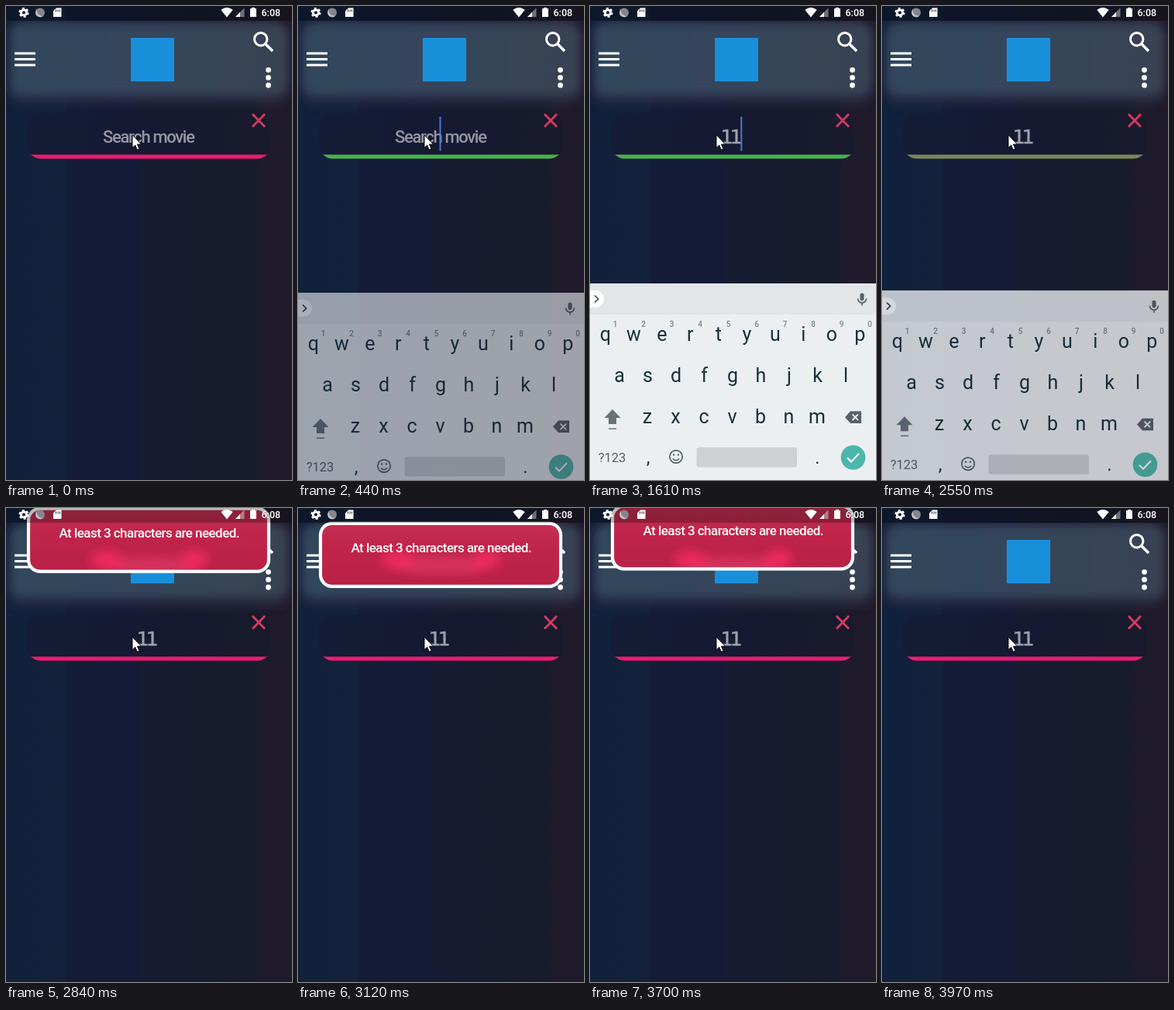
Recreate the animation shown at these times as an HTML page. Size 369x610 px, loop 4.18 s.

```html
<!DOCTYPE html>
<html lang="en">
<head>
<meta charset="utf-8">
<title>Search field validation</title>
<style>
  html, body { margin: 0; width: 100%; height: 100%; overflow: hidden; background: #14192f; }
  svg { display: block; width: 100vw; height: 100vh; }
  text { font-family: Roboto, "Liberation Sans", sans-serif; }
  .mid { text-anchor: middle; }
  .line { fill: none; stroke-linecap: round; stroke-linejoin: round; }
</style>
</head>
<body>
<svg viewBox="0 0 369 610" preserveAspectRatio="none">
  <defs>
    <linearGradient id="night">
      <stop offset="0" stop-color="#12213b"/>
      <stop offset=".211" stop-color="#13213b"/>
      <stop offset=".211" stop-color="#151c38"/>
      <stop offset=".464" stop-color="#151b37"/>
      <stop offset=".466" stop-color="#161c32"/>
      <stop offset=".65" stop-color="#161c2f"/>
      <stop offset=".88" stop-color="#181c2d"/>
      <stop offset=".882" stop-color="#1f1b2c"/>
      <stop offset="1" stop-color="#201b2b"/>
    </linearGradient>
    <linearGradient id="slate">
      <stop offset="0" stop-color="#30465b"/>
      <stop offset=".5" stop-color="#35455b"/>
      <stop offset="1" stop-color="#384353"/>
    </linearGradient>
    <linearGradient id="inset">
      <stop offset="0" stop-color="#141c36"/>
      <stop offset=".5" stop-color="#151932"/>
      <stop offset="1" stop-color="#191a2c"/>
    </linearGradient>
    <linearGradient id="crimson" x2="0" y2="1">
      <stop offset="0" stop-color="#c23153"/>
      <stop offset=".4" stop-color="#c1244a"/>
      <stop offset="1" stop-color="#b82146"/>
    </linearGradient>
    <filter id="soft" x="-20%" y="-50%" width="140%" height="200%"><feGaussianBlur stdDeviation="6"/></filter>
    <clipPath id="fieldClip"><rect x="27" y="138" width="315" height="58.600" rx="18"/></clipPath>
    <clipPath id="cardClip"><rect id="cardHole" x="29" width="310" height="81" rx="15"/></clipPath>
    <clipPath id="belowBar"><rect y="19" width="369" height="130"/></clipPath>
  </defs>

  <rect width="369" height="610" fill="url(#night)"/>

  <g clip-path="url(#belowBar)">
    <rect x="2" y="18" width="365" height="108" rx="20" fill="#30304b" opacity=".65" filter="url(#soft)"/>
    <rect x="7" y="23" width="355" height="91" rx="14" fill="url(#slate)" filter="url(#soft)"/>
    <rect x="14" y="29" width="341" height="80" rx="12" fill="url(#slate)" opacity=".5" filter="url(#soft)"/>
  </g>
  <path d="M11 61H38M11 68.500H38M11 76H38" stroke="#fff" stroke-width="3"/>
  <rect x="161" y="41" width="56" height="56" fill="#198fda"/>
  <g fill="none" stroke="#fff" stroke-width="3">
    <circle cx="328.700" cy="42.700" r="8.200"/>
    <path d="M334.500 48.500L344 58" stroke-width="3.500"/>
  </g>
  <g fill="#fff">
    <circle cx="338.500" cy="82.300" r="3.400"/>
    <circle cx="338.500" cy="92.200" r="3.400"/>
    <circle cx="338.500" cy="102" r="3.400"/>
  </g>

  <g clip-path="url(#fieldClip)">
    <rect x="27" y="138" width="315" height="59" fill="url(#inset)"/>
    <rect id="underline" x="27" y="191.300" width="315" height="6"/>
  </g>
  <path d="M318 139L334 155.500M334 139L318 155.500" stroke="#e0385f" stroke-width="2.700"/>
  <text id="hint" x="125" y="175.500" font-size="22" font-weight="500" letter-spacing="-1.330" fill="#9696a2">Search movie</text>
  <text id="typed" y="176.500" font-size="25.500" letter-spacing="-4.220" fill="#a0a0ab" stroke="#a0a0ab" stroke-width=".4" style="font-family:'DejaVu Sans',sans-serif"></text>
  <rect id="caret" y="142.500" width="2" height="44" fill="#477bd2"/>

  <g id="keyboard">
    <rect y="357" width="369" height="300" fill="#eceff1"/>
    <rect y="357" width="369" height="40" fill="#e2e6e9"/>
    <rect x="-12" y="366" width="30" height="22" rx="11" fill="#fff"/>
    <path d="M6.500 373L10.800 377L6.500 381" class="line" stroke="#37474f" stroke-width="1.700"/>
    <g id="words" class="mid" font-size="16.500" fill="#5f6b72">
      <path d="M129.500 366V388M237.500 366V388" stroke="#c5cacd"/>
      <text x="81" y="384">thanks</text><text x="183" y="384">I</text><text x="285" y="384">we</text>
    </g>
    <g fill="none" stroke="#566168" stroke-width="1.700">
      <rect x="349.300" y="370.300" width="3.400" height="8" rx="1.700" fill="#566168"/>
      <path d="M345.500 376.500a5.500 5.500 0 0 0 11 0M351 382V385.500"/>
    </g>
    <g id="keys" class="mid" fill="#17303a"></g>
    <path d="M29 519L39.500 530H34V538H24V530H18.500Z" fill="#687378"/>
    <path d="M24 544H34" stroke="#687378" stroke-width="1.500"/>
    <path d="M336 521.500H350V537H336L329 529.200Z" fill="#566168"/>
    <path d="M338.500 525.500L346 533M346 525.500L338.500 533" stroke="#eceff1" stroke-width="1.800"/>
    <g fill="none" stroke="#566168" stroke-width="1.700">
      <circle cx="111" cy="580" r="8.200"/>
      <path d="M107 582.500q4 4.500 8 0"/>
      <path d="M107 577.500h2.200M112.800 577.500h2.200" stroke-width="2.200"/>
    </g>
    <rect x="137.500" y="568" width="129.500" height="25.500" rx="3" fill="#cdd1d3"/>
    <circle cx="339.500" cy="581" r="15.800" fill="#4db6ac"/>
    <path d="M332 581.500L337 586.500L347 576" fill="none" stroke="#fff" stroke-width="2"/>
  </g>

  <g id="card">
    <g clip-path="url(#cardClip)">
      <rect id="cardFill" x="27" width="314" height="85" fill="url(#crimson)"/>
      <g filter="url(#soft)">
        <ellipse cx="186" cy="74" rx="64" ry="12" fill="#df3a66" opacity=".7"/>
        <ellipse cx="130" cy="67" rx="22" ry="12" fill="#f42a5e" opacity=".8"/>
        <ellipse cx="243" cy="66" rx="18" ry="12" fill="#f42a5e" opacity=".8"/>
      </g>
    </g>
    <rect id="cardEdge" x="29" width="310" height="81" rx="15" fill="none" stroke="#fff" stroke-width="4.200"/>
    <text id="message" x="68.500" font-size="17" font-weight="500" letter-spacing="-.55" fill="#fff">At least 3 characters are needed.</text>
  </g>

  <rect width="369" height="19" fill="#000" opacity=".27"/>
  <g fill="#fff">
    <circle cx="23" cy="8.500" r="3.600" fill="none" stroke="#fff" stroke-width="3"/>
    <circle cx="23" cy="8.500" r="5.600" fill="none" stroke="#fff" stroke-width="2" stroke-dasharray="2.930"/>
    <circle cx="44" cy="8.500" r="6" fill="#85858c"/>
    <path d="M40 4a6 6 0 1 0 8.500 8.500A7 7 0 0 1 40 4Z" fill="#c4c4c8"/>
    <path d="M65 2.500H71.500V14H61V6.500Z"/>
    <path d="M64.500 4.500V7.500M67 4.500V7.500M69.300 4.500V7.500" stroke="#303146"/>
    <path d="M277.300 5Q285 -1 292.700 5L285 14.500Z"/>
    <path d="M307.500 2.500V14H296Z" opacity=".4"/>
    <path d="M302 8V14H296Z"/>
    <path d="M317 2h4v1.300h2V14H315V3.300h2Z"/>
    <text x="329.500" y="13.300" font-size="12.500" font-weight="500">6:08</text>
  </g>

  <path d="M163 166V182.500L166.700 179L169.200 185L172 183.800L169.400 178H174.500Z" fill="#fff" stroke="#000" stroke-width=".9"/>
</svg>
<script>
const LOOP = 4180;
const GREEN = [76, 175, 80], PINK = [236, 28, 114];
const CARD_TOP = 20, CARD_TRAVEL = 110;
const $ = id => document.getElementById(id);
const set = (id, attrs) => {
  for (const name in attrs) $(id).setAttribute(name, attrs[name]);
};
const ramp = (t, from, to) => Math.min(1, Math.max(0, (t - from) / (to - from)));
const mix = (a, b, p) => `rgb(${a.map((v, i) => Math.round(v + (b[i] - v) * p))})`;
const circ = u => 1 - Math.sqrt(1 - u * u);
const show = (id, on) => set(id, { visibility: on ? 'visible' : 'hidden' });

function buildKeys() {
  const label = (s, x, y, size, extra = '') =>
    `<text x="${x}" y="${y}" font-size="${size}" ${extra}>${s}</text>`;
  const row = (letters, x, y) =>
    [...letters].map((c, i) => label(c, x + i * 36.5, y, 25)).join('');
  const digits = [...'1234567890'].map((d, i) =>
    label(d, 32.5 + i * 36.5, 413, 10, 'fill="#7b868b" font-weight="500"')).join('');
  $('keys').innerHTML = row('qwertyuiop', 19.8, 431) + row('asdfghjkl', 38, 484) +
    row('zxcvbnm', 74, 537) + digits + label('?123', 28.5, 587, 16.5, 'fill="#566168"') +
    label(',', 75, 589, 24) + label('.', 293.5, 589, 24);
}

function drawField(t) {
  const focus = ramp(t, 90, 290) - ramp(t, 2495, 2695);
  set('underline', { fill: mix(PINK, GREEN, focus) });
  const count = t < 1220 ? 0 : t < 1610 ? 1 : 2;
  $('typed').textContent = '1'.repeat(count);
  set('typed', { x: 180.4 - count * 6 });
  set('hint', { opacity: 1 - ramp(t, 1200, 1340) });
  set('caret', { x: count ? 182.3 + count * 6 : 182.5 });
  show('caret', (t >= 380 && t < 880) || (t >= 1220 && t < 2140));
}

function drawKeyboard(t) {
  const rise = 1 - (1 - ramp(t, 330, 610)) ** 2;
  const fall = ramp(t, 2495, 2695);
  const y = 33 * (1 - rise) + 33 * fall;
  set('keyboard', {
    transform: `translate(0 ${y.toFixed(2)})`,
    opacity: rise * (1 - fall ** 1.35)
  });
  set('words', { opacity: t < 1220 ? ramp(t, 615, 670) : 0 });
}

function drawCard(t) {
  const away = t < 3260 ? 1 - ramp(t, 2552, 3260) : ramp(t, 3260, 3960);
  const y = CARD_TOP - CARD_TRAVEL * circ(away);
  set('cardFill', { y });
  set('cardHole', { y: y + 2 });
  set('cardEdge', { y: y + 2 });
  set('message', { y: y + 39.3 });
  show('card', away < 1);
}

function draw(t) {
  drawField(t);
  drawKeyboard(t);
  drawCard(t);
}

buildKeys();
const start = performance.now();
function tick() {
  draw((performance.now() - start) % LOOP);
  requestAnimationFrame(tick);
}
draw(0);
requestAnimationFrame(tick);
</script>
</body>
</html>
```
